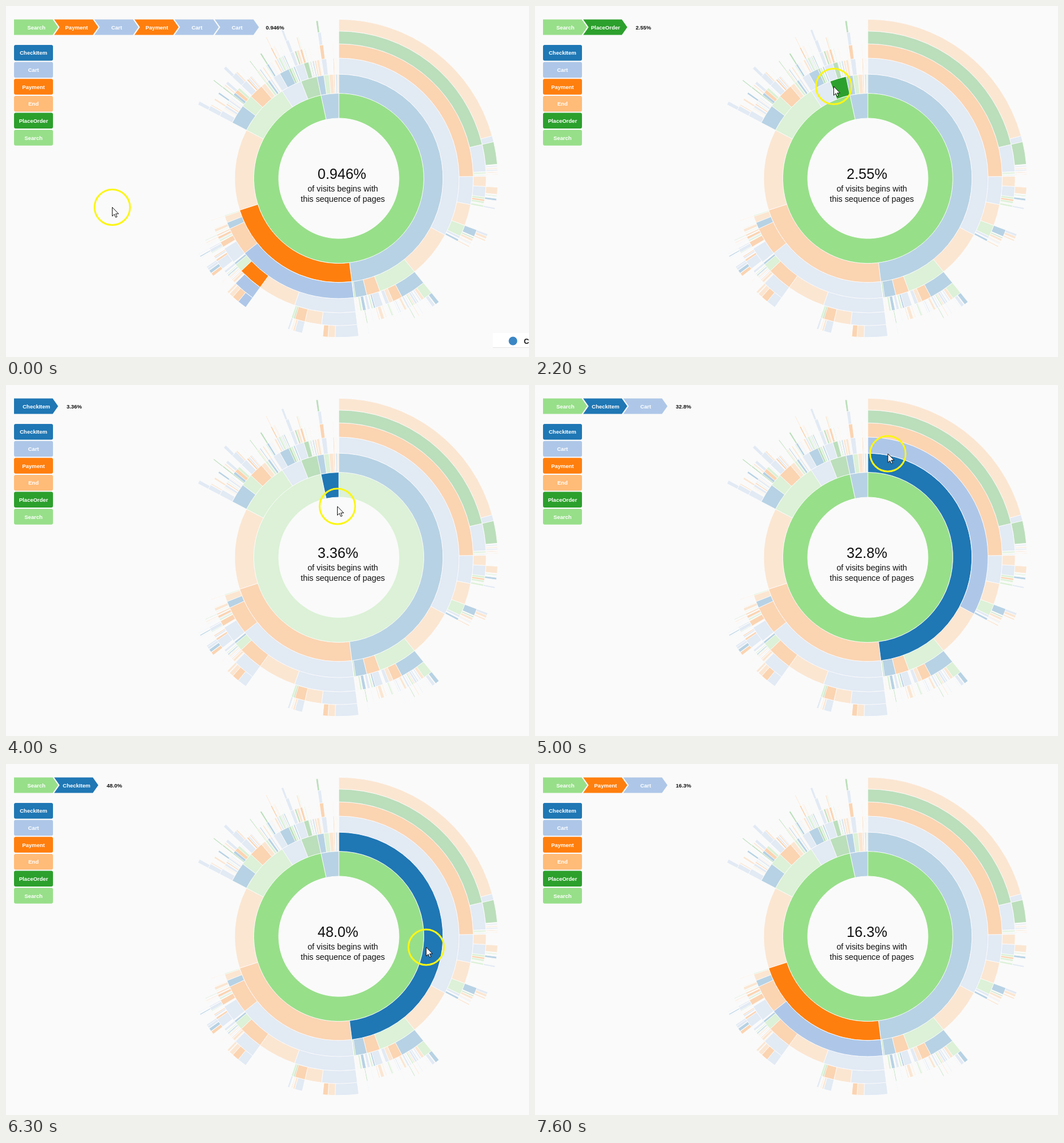
These frames come from a looping animation (913x613 px, 9.1 s). An HTML page:

```html
<!DOCTYPE html>
<html lang="en">
<head>
<meta charset="utf-8">
<title>Sequence sunburst</title>
<style>
  html, body { margin: 0; width: 100%; height: 100%; overflow: hidden; background: #fafafa; }
  svg { display: block; width: 913px; height: 613px; }
  text { font-family: "Liberation Sans", Arial, sans-serif; fill: #111; }
  .label { font-weight: bold; font-size: 9.5px; text-anchor: middle; }
  .white { fill: #fff; }
</style>
</head>
<body>
<svg id="stage" viewBox="0 0 913 613"></svg>
<script>
const CX = 581, CY = 301, R = 105, LEVELS = 6, TICK = 100, LOOP = 9100;
const PAGES = {
  I: ['CheckItem', '#1f77b4'], A: ['Cart', '#aec7e8'], P: ['Payment', '#ff7f0e'],
  E: ['End', '#ffbb78'], O: ['PlaceOrder', '#2ca02c'], S: ['Search', '#98df8a']
};

// Page letter + width in degrees, (children), _ = gap, ~ = scatter thin slices over the rest
const TREE = `
S347.904(
  I172.8(
    A118.08(
      P89.2(O76.7(E74.5 A2.2) A10.7(O8.2 _.4 ~) ~)
      A12.1(E4 A4.1(E2.6 _.4 S.4) S.9(I.8) P.8 ~)
      E9.2
      S5(I2.8(A.9 E1 ~) ~)
      ~)
    E22.9
    S19(I11(S3.6(I1.5 ~) E1.2 ~) P4.2(~) E1.8 A1.6(~) ~)
    P6.5(_.8 A3.4(~) I.7 ~)
    I5.5(A1.2 _.6 I1.4(~) ~)
    O.6)
  P79.4(
    A58.68(
      A26.4(A13.9(A8.5 E2.6 P1.9) E6.6 P4.1(A2.8 E.7 ~) O.5 S.9(~))
      E16.6
      P10.7(A8.7(A3.406 P2.6 E1.6 ~) ~)
      S3.6(~) I.9(~) ~)
    P13.7(A7(_.6 A3.6(P1.2 ~) P.8(A.6) ~) _.8 P2.4(~) ~)
    I3.2(~) E3.2 S.5(E.3))
  E45.4
  S29.4(
    I9.4(A2.6(A1.9(A1.4) ~) ~)
    S6(_.9 O.5(O.5(O.4)) I1.2(~) P1.6(~) S1.2 ~)
    P7(_.6 A2.9(A2.2(A1.2) ~) ~)
    E2.2 ~)
  A11.72(A3.6(~) I4.8(~) O1(~) S1.1 ~)
  O9.18(A4.3(A1.6(A1.4(A.9)) ~) O2.4(~) ~))
I12.096(I3.8(~) S2.9(A2.4(P1.7(A1.4(O.8)))) E2.4 ~)`;

let seed = 11;
const rnd = () => (seed = seed * 16807 % 2147483647) / 2147483647;
const nodes = [];

function add(parent, page, start, width) {
  const node = { parent, page, start, width, depth: parent.depth + 1 };
  nodes.push(node);
  return node;
}

function scatter(parent, from) {
  if (parent.depth >= LEVELS) return;
  const end = parent.start + parent.width;
  for (let a = from; ; ) {
    a += rnd() * .45;
    const w = Math.min(.2 + rnd() ** 2 * 1.2, end - a);
    if (w < .12) return;
    const page = 'AAAEEIPSO'[Math.floor(rnd() * 9)];
    const node = add(parent, page, a, w);
    if (page !== 'E' && rnd() < .7) scatter(node, a);
    a += w;
  }
}

const tokens = TREE.match(/[A-Z_][\d.]+|[()~]/g);
function read(parent) {
  let a = parent.start, last;
  while (tokens.length) {
    const t = tokens.shift();
    if (t === ')') return;
    if (t === '(') read(last);
    else if (t === '~') scatter(parent, a);
    else {
      const w = +t.slice(1);
      if (t[0] !== '_') last = add(parent, t[0], a, w);
      a += w;
    }
  }
}
read({ start: 0, width: 360, depth: 0 });

const stage = document.getElementById('stage');
function el(tag, attrs, parent = stage, text = '') {
  const e = document.createElementNS('http://www.w3.org/2000/svg', tag);
  for (const k in attrs) e.setAttribute(k, attrs[k]);
  e.textContent = text;
  return parent.appendChild(e);
}
const label = (x, y, text, parent, cls = 'label white') => el('text', { x, y, class: cls }, parent, text);

function arc({ start, width, depth }) {
  const r0 = R * Math.sqrt(depth), r1 = R * Math.sqrt(depth + 1);
  const at = (r, deg) => {
    const a = deg * Math.PI / 180;
    return (CX + r * Math.sin(a)).toFixed(2) + ' ' + (CY - r * Math.cos(a)).toFixed(2);
  };
  const end = start + width, big = +(width > 180);
  return `M${at(r1, start)}A${r1} ${r1} 0 ${big} 1 ${at(r1, end)}` +
         `L${at(r0, end)}A${r0} ${r0} 0 ${big} 0 ${at(r0, start)}Z`;
}
for (const n of nodes)
  n.el = el('path', { d: arc(n), fill: PAGES[n.page][1], stroke: '#fff', 'stroke-width': .9 });

Object.values(PAGES).forEach(([name, fill], i) => {
  const y = 68 + i * 29.65;
  el('rect', { x: 14, y, width: 68, height: 27.5, rx: 3, fill });
  label(48, y + 17.3, name);
});

const percent = el('text', { x: 544, y: 301.5, 'font-size': 25 });
[['of visits begins with', 324], ['this sequence of pages', 342]].forEach(([s, y]) =>
  el('text', { x: 588, y, 'font-size': 14.3, 'text-anchor': 'middle' }, stage, s));

const crumbs = el('g', {});

const panel = el('g', {});
el('rect', { x: 850, y: 571, width: 63, height: 26, fill: '#fff' }, panel);
el('rect', { x: 850, y: 596, width: 63, height: 1, fill: '#e4e4e4' }, panel);
el('circle', { cx: 885, cy: 585, r: 7.5, fill: '#3b86c4' }, panel);
el('text', { x: 904, y: 590, 'font-size': 12.5, 'font-weight': 'bold' }, panel, 'Co');

const cursor = el('g', {});
el('circle', { r: 31, fill: 'none', stroke: '#fbf615', 'stroke-width': 3 }, cursor);
el('path', { d: 'M0 0V15.5L3.6 12.2 6 17.6 8.4 16.6 6 11.4H11Z', fill: '#fff', stroke: '#111' }, cursor);

// Pointer route: tick, x, y
const ROUTE = [
  [0, 185.5, 351.5], [10, 520.5, 229], [14, 520, 185], [18, 515, 150], [22, 521.5, 140.5],
  [24, 490, 225], [27, 581, 415], [30, 718, 305],
  [33, 600, 215], [34, 568, 178], [36, 556, 40], [38, 568, 165], [40, 578.5, 212],
  [43, 612, 518], [46, 795, 325], [48, 705, 72], [50, 616, 120],
  [53, 690, 62], [56, 805, 200], [58, 797, 349], [60, 816, 335], [63, 733.5, 320],
  [66, 690, 400], [70, 565, 459], [72, 550, 492], [74, 545, 498], [75, 547, 600], [76, 548, 660]
];
const LAST = ROUTE[ROUTE.length - 1][0];

function pointer(tick) {
  const i = Math.max(1, ROUTE.findIndex(k => k[0] >= tick));
  const [t0, x0, y0] = ROUTE[i - 1], [t1, x1, y1] = ROUTE[i];
  const p = (tick - t0) / (t1 - t0);
  return [x0 + (x1 - x0) * p, y0 + (y1 - y0) * p];
}

function hit(x, y) {
  const dx = x - CX, dy = CY - y;
  const depth = Math.floor((dx * dx + dy * dy) / (R * R));
  const deg = (Math.atan2(dx, dy) * 180 / Math.PI + 360) % 360;
  return nodes.find(n => n.depth === depth && deg >= n.start && deg < n.start + n.width);
}

// The last slice touched stays lit while the pointer is over empty space
const states = [];
let lit = hit(411, 513);
for (let i = 0; i <= LAST; i++) {
  const pos = pointer(i);
  lit = hit(...pos) || lit;
  states.push({ pos, lit });
}

function select(node) {
  const trail = [];
  for (let n = node; n.page; n = n.parent) trail.unshift(n);
  for (const n of nodes) n.el.setAttribute('opacity', trail.includes(n) ? 1 : .3);

  const value = (node.width / 3.6).toPrecision(3) + '%';
  percent.textContent = value;
  crumbs.replaceChildren();
  trail.forEach((n, i) => {
    const [name, fill] = PAGES[n.page], x = 14 + i * 70.1;
    const notch = i ? 'l9.5-13.5' : '';
    el('path', { d: `M${x} 23.5h67.5l9.5 13.5-9.5 13.5h-67.5${notch}Z`, fill }, crumbs);
    label(x + 39, 40.5, name, crumbs);
  });
  label(49 + trail.length * 70.1, 40.5, value, crumbs, 'label');
}

let shown = -1, selected;
function frame(now) {
  const tick = Math.min(LAST, Math.floor(now % LOOP / TICK));
  if (tick !== shown) {
    shown = tick;
    const { pos, lit } = states[tick];
    if (lit !== selected) select(selected = lit);
    cursor.setAttribute('transform', `translate(${pos})`);
    panel.setAttribute('visibility', tick ? 'hidden' : 'visible');
  }
  requestAnimationFrame(() => frame(performance.now() - begun));
}
const begun = performance.now();
frame(0);
</script>
</body>
</html>
```
